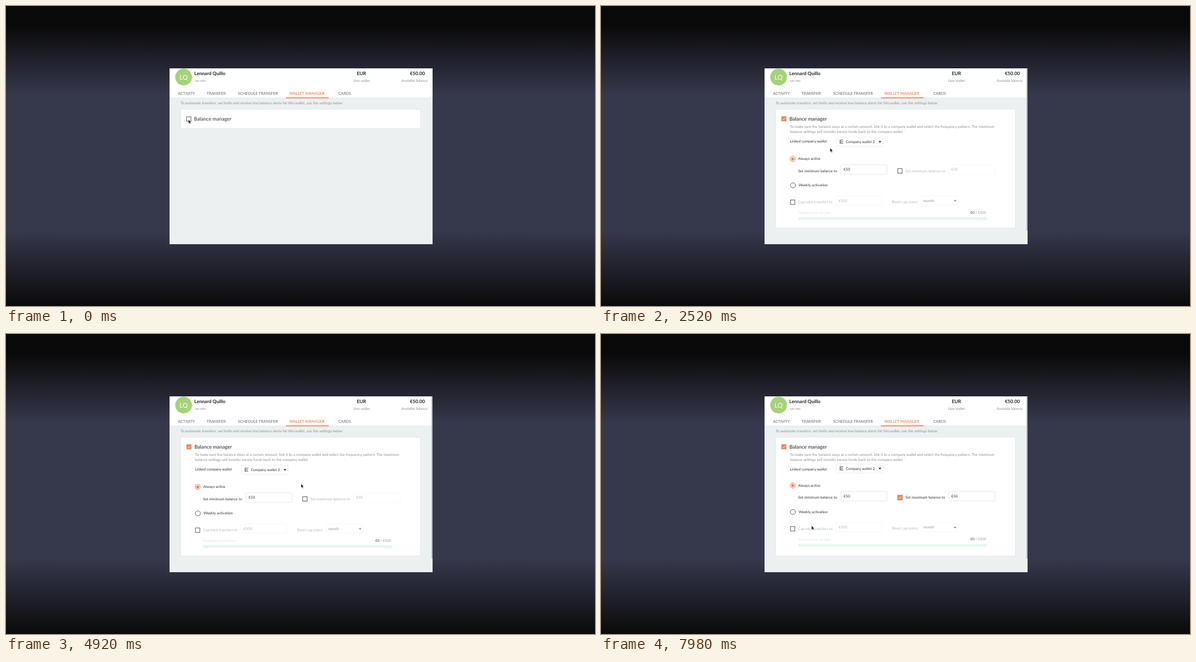
An HTML page that plays this animation: 1048 by 534 pixels, repeating every 8 s.

```html
<!DOCTYPE html>
<html lang="en">
<head>
<meta charset="utf-8">
<title>Wallet manager</title>
<style>
  html, body { margin: 0; width: 100%; height: 100%; overflow: hidden; background: #080808; }
  svg { display: block; width: 1048px; height: 534px; }
  text { font: 6.58px Lato, sans-serif; fill: #333; text-rendering: geometricPrecision; }
  .mid { text-anchor: middle; }
  .bold { font-size: 8.5px; font-weight: 700; fill: #25252b; }
  .note { fill: #8c8f92; }
  .small { font-size: 6.15px; fill: #8c8f92; }
  .tabs text { font-size: 6.87px; font-weight: 500; fill: #717176; }
  .tabs .on { fill: #f0743f; }
  .title { font-size: 8.95px; }
  .box { fill: #fff; stroke: #dfe1e4; stroke-width: .8; }
  .faint { stroke: #f4f5f6; }
  .tick { fill: #fff; stroke: #5a5a5e; stroke-width: 1; }
  .dim text, text.dim { fill: #b3b5b8; }
  .checked { fill: #e9895b; }
  .mark { fill: none; stroke: #fff; stroke-width: 1; }
</style>
</head>
<body>
<svg viewBox="0 0 1048 534">
  <defs>
    <linearGradient id="night" x2="0" y2="534" gradientUnits="userSpaceOnUse">
      <stop offset=".067" stop-color="#0a0a0a"/>
      <stop offset=".295" stop-color="#36384c"/>
      <stop offset=".75" stop-color="#36384c"/>
      <stop offset="1" stop-color="#0a0a0a"/>
    </linearGradient>
    <g id="check">
      <rect class="checked" width="9" height="9" rx="1"/>
      <path class="mark" d="M2 4.6 3.8 6.3 7.1 2.8"/>
    </g>
    <path id="caret" d="M0 0h5l-2.5 3z"/>
  </defs>
  <rect width="1048" height="534" fill="url(#night)"/>

  <rect x="291" y="111" width="468" height="313" fill="#ecf0f1"/>
  <rect x="291" y="111" width="468" height="53" fill="#fff"/>
  <path d="M291 163.8h468" stroke="#dcdfe1" stroke-width=".7"/>
  <circle cx="316" cy="126.5" r="14.9" fill="#a5d378"/>
  <text class="mid" x="316" y="131" style="font-size:11.3px;fill:#fff">LQ</text>
  <text class="bold" x="335" y="122.7">Lennard Quillo</text>
  <text class="small" x="336" y="134.6" style="font-size:5.4px">Job title</text>
  <text class="bold mid" x="632.5" y="123.3">EUR</text>
  <text class="small mid" x="632.5" y="135.2">User wallet</text>
  <text class="bold mid" x="732" y="123.3">€50.00</text>
  <text class="small mid" x="727" y="135.2">Available balance</text>
  <g class="tabs">
    <text x="306" y="157.7">ACTIVITY</text>
    <text x="356.8" y="157.7">TRANSFER</text>
    <text x="412.7" y="157.7">SCHEDULE TRANSFER</text>
    <text class="on" x="504.3" y="157.7">WALLET MANAGER</text>
    <text x="591.3" y="157.7">CARDS</text>
  </g>
  <rect x="498" y="162.7" width="76" height="1.5" fill="#f0743f"/>
  <text class="note" x="310.8" y="174.9">To automate transfers, set limits and receive low balance alerts for this wallet, use the settings below</text>
  <rect id="scrollbar" x="757" y="111" width="2" height="289" fill="#b4b7ba"/>

  <rect id="card" class="box" x="310.6" y="183.6" width="426.8" height="34.6" rx="2"/>
  <g id="closed">
    <rect class="tick" x="321.3" y="197.2" width="7.8" height="8"/>
    <text class="title" x="334.6" y="204.2">Balance manager</text>
  </g>

  <g id="open">
    <use href="#check" x="321" y="196.2"/>
    <text class="title" x="335.2" y="203.8" style="font-weight:500">Balance manager</text>
    <text class="note" x="336.3" y="217.2">To make sure the balance stays at a certain amount, link it to a company wallet and select the frequency pattern. The maximum</text>
    <text class="note" x="336.3" y="225.8">balance settings will transfer excess funds back to the company wallet</text>
    <text x="336.3" y="243">Linked company wallet</text>
    <g id="settings">
      <rect class="box" x="419" y="233.7" width="83" height="16.3" rx="2" style="stroke:#e6e8ea"/>
      <path d="M424.5 238.6h6.3M424.5 241.6h6.3M424.5 244.4h6.3M425.6 238v7" stroke="#77777c" stroke-width="1.3"/>
      <text x="435.7" y="244.2">Company wallet 2</text>
      <use href="#caret" x="493.8" y="240.5" fill="#222"/>

      <circle cx="341" cy="272.2" r="4.4" fill="#fff" stroke="#ea7f4e" stroke-width="1.1"/>
      <circle cx="341" cy="272.2" r="2.5" fill="#ea7f4e"/>
      <text x="350.8" y="274.4">Always active</text>
      <text x="350.8" y="295.9">Set minimum balance to</text>
      <rect class="box" x="426.8" y="282.7" width="82" height="17" rx="1.5"/>
      <text x="431.8" y="293.4">€50</text>

      <rect class="tick" x="528" y="289.6" width="7.8" height="8"/>
      <use id="maxCheck" href="#check" x="527.4" y="289"/>
      <g id="max">
        <text x="541.7" y="295.9">Set maximum balance to</text>
        <rect id="maxBox" class="box" x="619" y="282.7" width="82.3" height="17" rx="1.5"/>
        <text x="623.2" y="293.4">€50</text>
      </g>

      <circle class="tick" cx="341.5" cy="319.2" r="4.4"/>
      <text x="351.7" y="321.4">Weekly activation</text>

      <rect class="tick" x="337.1" y="345.2" width="7.8" height="8"/>
      <rect class="box faint" x="418" y="338" width="82" height="16.6" rx="1.5"/>
      <rect class="box faint" x="569.5" y="338" width="66.5" height="16.6" rx="1.5"/>
      <g class="dim">
        <text x="350.8" y="351.3">Cap total transfers to</text>
        <text x="422.7" y="348.9">€500</text>
        <text x="517.6" y="350.6">Reset cap every</text>
        <text x="573.6" y="348.9" style="fill:#909396">month</text>
      </g>
      <use href="#caret" x="627.6" y="345.6" fill="#88898c"/>
      <text x="351" y="370.1" style="font-size:5.8px;fill:#d9e2de">Transferred so far (Jan)</text>
      <text x="657.3" y="369.6" style="font-size:6.3px;fill:#999"><tspan fill="#444">€0</tspan> / €500</text>
      <rect x="351" y="376" width="336" height="5" fill="#e4f8ee"/>
    </g>
  </g>

  <circle id="ring" r="14.4" fill="none" stroke="#222" stroke-width="1.2"/>
  <g id="cursor">
    <path id="arrow" d="M0 0v7.2l1.6-1.5 1.2 2.6 1.2-.6-1.2-2.5h2.2z" fill="#111" stroke="#fff" stroke-width=".5"/>
    <path id="hand" d="M-.9 4V.5q.8-.9 1.6 0v2l2.8.7q.8.3.7 1.2l-.5 2.3-.7 1.1H.3L-2 4.9q.2-1 1.1-.9z" fill="#fff" stroke="#222" stroke-width=".8"/>
  </g>
</svg>
<script>
const LOOP = 8000, SCROLLBAR_AT = 960, OPEN_AT = 1350, MAX_AT = 6210;
const el = id => document.getElementById(id);
const show = (id, on) => el(id).setAttribute('visibility', on ? 'inherit' : 'hidden');
const within = (t, from, to) => t >= from && t < to;

// time, x, y of the pointer tip
const path = [
  [0, 324.5, 202], [300, 326.7, 197.6], [1270, 326.7, 197.6], [1600, 407.6, 252.7],
  [2700, 407.6, 252.7], [3200, 410, 252.7], [4200, 410, 252.7], [4880, 525, 266.6],
  [5150, 525, 266.6], [5600, 534.3, 296], [6900, 534.3, 296], [7900, 374.6, 341.2], [8000, 374.6, 341.2]
];

function pointerAt(t) {
  const i = path.findIndex(p => p[0] > t);
  const [t0, x0, y0] = path[i - 1], [t1, x1, y1] = path[i];
  const k = (t - t0) / (t1 - t0), e = k * k * (3 - 2 * k);
  return [x0 + (x1 - x0) * e, y0 + (y1 - y0) * e];
}

function draw(now) {
  const t = now % LOOP, isOpen = t >= OPEN_AT, hasMax = t >= MAX_AT;
  const at = `translate(${pointerAt(t)})`;
  const overBox = within(t, 200, 1320) || within(t, 5480, 7050);

  show('scrollbar', t >= SCROLLBAR_AT);
  show('closed', !isOpen);
  show('open', isOpen);
  show('maxCheck', isOpen && hasMax);
  el('card').setAttribute('height', isOpen ? 211.6 : 34.6);
  el('max').setAttribute('class', hasMax ? '' : 'dim');
  el('maxBox').setAttribute('class', hasMax ? 'box' : 'box faint');
  el('settings').setAttribute('transform', `translate(0 ${hasMax ? -2.4 : 0})`);

  show('arrow', !overBox);
  show('hand', overBox);
  show('ring', within(t, 1140, 1270) || within(t, 5970, 6110));
  el('cursor').setAttribute('transform', at);
  el('ring').setAttribute('transform', at);
}

const start = performance.now();
(function tick() {
  draw(performance.now() - start);
  requestAnimationFrame(tick);
})();
</script>
</body>
</html>
```
